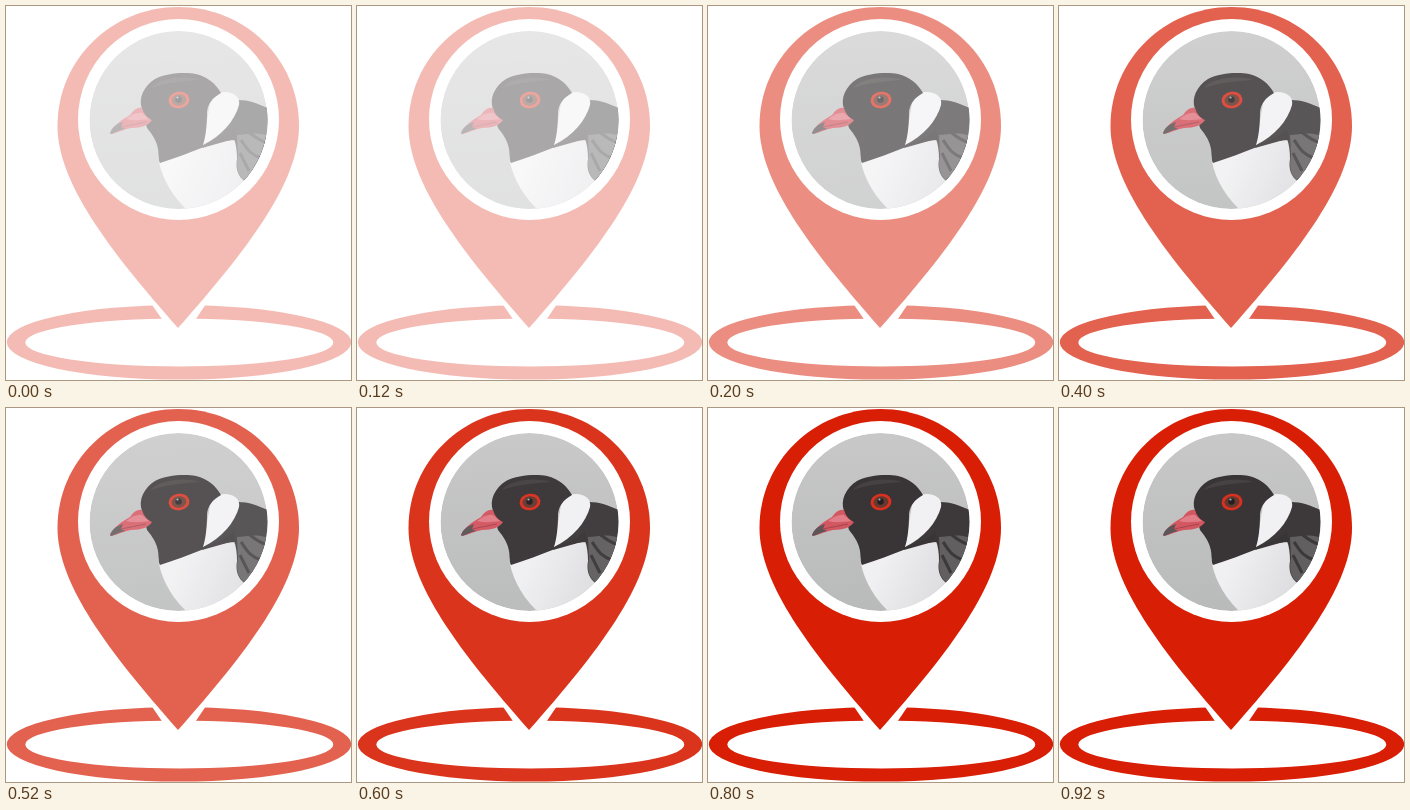
Recreate the animation shown at these times as an HTML page with a canvas. Size 345x374 px, loop 1000 ms.

```html
<!DOCTYPE html>
<html lang="en">
<head>
<meta charset="utf-8">
<title>Bird location pin</title>
<style>
  html, body { margin: 0; width: 100%; height: 100%; overflow: hidden; background: #fff; }
  canvas { display: block; width: 345px; height: 374px; }
</style>
</head>
<body>
<canvas id="stage" width="345" height="374"></canvas>
<script>
const ctx = document.getElementById('stage').getContext('2d');
const RED = '#d81e05';
const STEP = 200;
const LEVELS = [0.3, 0.5, 0.7, 0.9, 1];

const PIN = new Path2D('M172.5 1C106 1 51.5 53 51.5 120C51.5 176 102 243 172 322C242 243 293 176 293 120C293 53 239 1 172.5 1Z');
const GAP = new Path2D('M145.5 298L200 298L173 338Z');

const ring = new Path2D();
ring.ellipse(173, 336.3, 172.2, 37.3, 0, 0, Math.PI * 2);
ring.ellipse(173.3, 336.5, 154, 24, 0, 0, Math.PI * 2);

function disc(x, y, r) {
  const p = new Path2D();
  p.arc(x, y, r, 0, Math.PI * 2);
  return p;
}
const rim = disc(172.5, 113.5, 100.5);
const lens = disc(172.5, 114, 89);

function fill(shape, color, rule = 'nonzero') {
  ctx.fillStyle = color;
  ctx.fill(typeof shape === 'string' ? new Path2D(shape) : shape, rule);
}

function line(d, color, width) {
  ctx.strokeStyle = color;
  ctx.lineWidth = width;
  ctx.stroke(new Path2D(d));
}

function oval(x, y, rx, ry, color) {
  ctx.fillStyle = color;
  ctx.beginPath();
  ctx.ellipse(x, y, rx, ry, -0.15, 0, Math.PI * 2);
  ctx.fill();
}

function gradient(x0, y0, x1, y1, from, to) {
  const g = ctx.createLinearGradient(x0, y0, x1, y1);
  g.addColorStop(0, from);
  g.addColorStop(1, to);
  return g;
}

function drawBird() {
  fill(lens, gradient(170, 25, 175, 200, '#c8c8c8', '#b9baba'));

  // breast
  fill('M152 150C154 166 162 186 181 204L240 204L246 140L210 128Z',
    gradient(170, 160, 235, 190, '#f0eff1', '#dcdbdf'));

  // back and folded wing
  fill('M232 94C243 94 253 98 264 103L264 150L240 176C233 172 229 164 231 153C231 145 230 138 228 133L196 142L212 116Z', '#3d393a');
  fill('M231 129C240 129 249 125 262 130L260 150L240 175C231 170 230 160 232 150Z', '#625f60');
  line('M236 121C246 128 250 134 262 137M235 134C241 142 243 148 255 152M234 147L243 165', '#3d393a', 3);

  // nape patch
  fill('M205 91C212 86 219 85 225 87C231 89 234 93 233 99C229 114 216 130 197 139Z', '#f1f0f2');

  // hood
  fill('M136 103C132 92 138 80 149 73C160 67 179 66 190 68C202 71 210 78 215 87C206 92 202 98 201 106C201 118 200 130 197 139C210 136 221 130 228 123L230 134C218 134 207 138 198 141C183 147 169 152 154 157C152 154 153 148 152 143C151 136 147 129 141 122Z', '#393435');
  fill('M145 82C153 72 178 69 194 74C177 75 159 77 145 82Z', '#464142');

  // bill
  fill('M104 127C107 120 115 114 124 109C128 103 132 101 136 102C138 109 142 112 146 114C143 119 136 122 125 122C118 123 111 127 105 128Z', '#d35761');
  fill('M120 113C127 108 132 106 136 107L143 113C135 114 127 115 120 113Z', '#e07d86');
  fill('M104 127C106 121 111 118 117 116L115 121L119 123C113 124 109 127 105 128Z', '#5d5557');
  line('M115 121C123 119 132 118 140 116', '#a04650', 1);

  // eye
  oval(173, 94, 10.5, 8.3, '#d9301f');
  oval(173, 94, 7.5, 5.8, '#66392f');
  fill(disc(172.5, 93.5, 3.2), '#242022');
  fill(disc(171.5, 91.5, 1.1), '#a9b0b5');
}

function draw(level) {
  ctx.globalAlpha = 1;
  fill('M0 0H345V374H0Z', '#fff');

  ctx.globalAlpha = level;
  fill(ring, RED, 'evenodd');
  ctx.globalAlpha = 1;
  fill(GAP, '#fff');
  ctx.globalAlpha = level;
  fill(PIN, RED);
  ctx.globalAlpha = 1;
  fill(rim, '#fff');

  ctx.save();
  ctx.clip(lens);
  drawBird();
  // the photo fades in faster than the pin
  ctx.globalAlpha = (1 - level) ** 1.6;
  fill(rim, '#fff');
  ctx.restore();
}

function tick() {
  const step = Math.floor(performance.now() / STEP) % LEVELS.length;
  draw(LEVELS[step]);
  requestAnimationFrame(tick);
}
tick();
</script>
</body>
</html>
```
